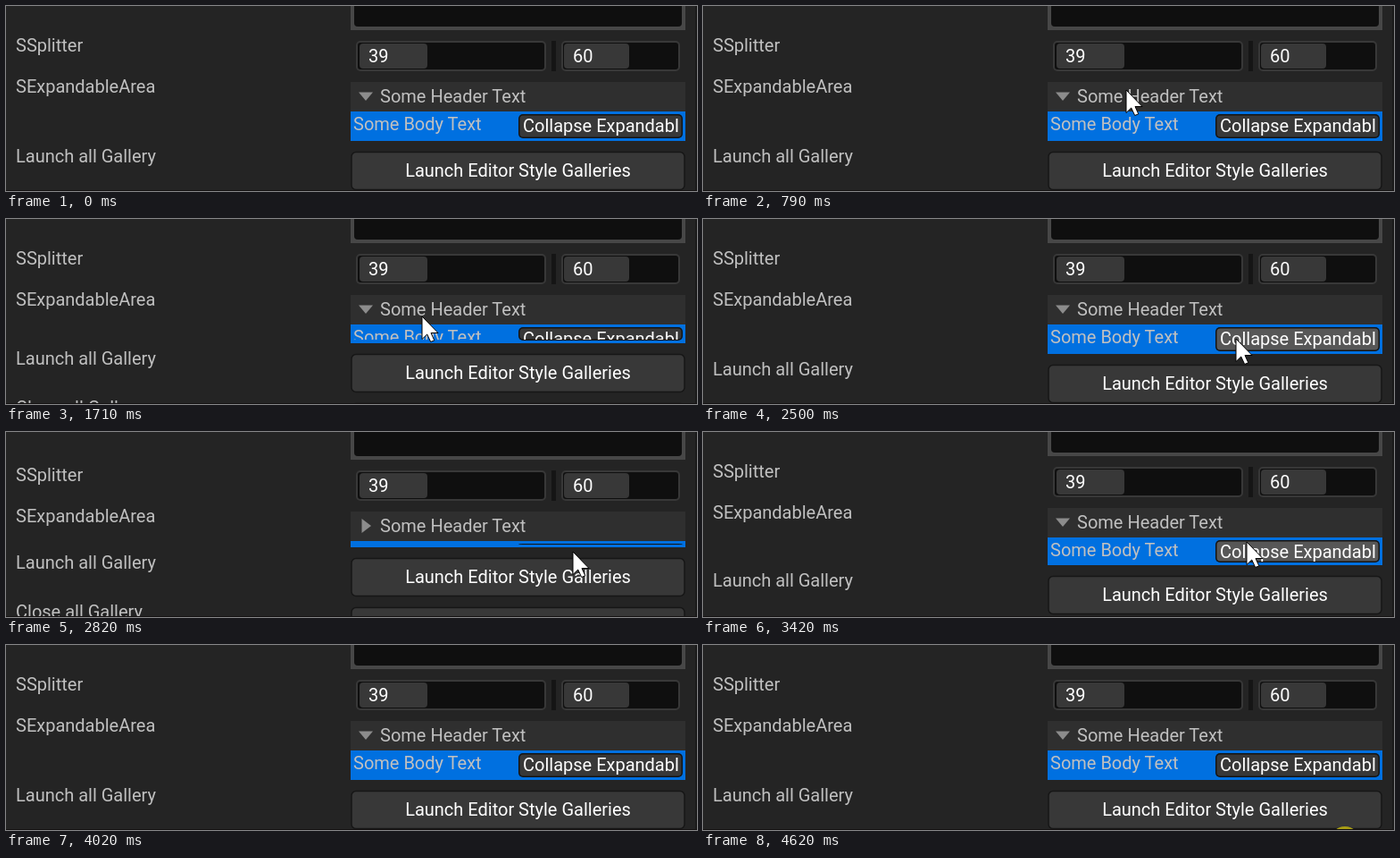
These frames come from a looping animation (774 px wide and 207 px high, 4680 ms). An HTML page:

```html
<!DOCTYPE html>
<html lang="en">
<head>
<meta charset="utf-8">
<title>Expandable area</title>
<style>
  html, body { margin: 0; width: 100%; height: 100%; overflow: hidden; background: #242424; }
  svg { display: block; font: 20px Roboto, sans-serif; fill: #c0c0c0; }
  .white { fill: #fff; }
  .mid { text-anchor: middle; }
  .field { fill: #0f0f0f; stroke: #383838; stroke-width: 2; }
  .bar { fill: #383838; }
  .button { fill: #383838; stroke: #161616; stroke-width: 1.5; }
  .hover { fill: #575757; }
</style>
</head>
<body>
<svg width="774" height="207" viewBox="0 0 774 207">
  <clipPath id="clip"><rect id="clipBox" x="386" y="121" width="375"/></clipPath>
  <rect width="774" height="207" fill="#242424"/>
  <rect x="772" width="2" height="207" fill="#1a1a1a"/>

  <g id="upper">
    <rect x="386" y="-60" width="375" height="87" fill="#474747"/>
    <rect x="390" y="-56" width="367" height="79" rx="4" fill="#0f0f0f"/>
    <text x="408" y="-8" fill="#4d4d4d">file, directory here</text>

    <text x="11" y="51">SSplitter</text>
    <rect class="field" x="393" y="40" width="211" height="32" rx="4"/>
    <rect class="bar" x="396" y="42" width="76" height="28" rx="4"/>
    <text class="white" x="406" y="63">39</text>
    <rect x="611" y="39" width="5" height="34" fill="#151515"/>
    <rect class="field" x="623" y="40" width="131" height="32" rx="4"/>
    <rect class="bar" x="625" y="42" width="73" height="28" rx="4"/>
    <text class="white" x="635" y="63">60</text>

    <text x="11" y="97">SExpandableArea</text>
    <rect x="386" y="85" width="375" height="33" fill="#2f2f2f"/>
    <path id="arrow" fill="#8c8c8c"/>
    <text x="419" y="108">Some Header Text</text>

    <rect id="body" x="386" y="118" width="375" fill="#0070e0"/>
    <rect id="edge" x="574" y="121" width="184" rx="5" fill="#141414"/>
    <rect id="face" x="575.5" y="122.5" width="181" rx="4" class="bar"/>
    <g clip-path="url(#clip)">
      <text x="389" y="139">Some Body Text</text>
      <text class="white" x="579" y="141">Collapse Expandabl</text>
    </g>
  </g>

  <g id="lower">
    <text x="11" y="175">Launch all Gallery</text>
    <rect id="launch" class="button" x="387" y="163.5" width="373" height="42" rx="5"/>
    <text class="white mid" x="573.5" y="191">Launch Editor Style Galleries</text>
    <text x="11" y="230">Close all Gallery</text>
    <rect class="button" x="387" y="218.5" width="373" height="42" rx="5"/>
  </g>

  <circle id="glow" cx="719" cy="220" r="17" fill="#aa9f14"/>
  <rect y="206" width="774" height="1" fill="#151212"/>
  <path id="cursor" d="M0 0V25.5L5.7 20L9.7 28.5L13.8 26.8L10 18.5H18Z" fill="#fff" stroke="#000"/>
</svg>
<script>
const LOOP = 4680, TICK = 66, FULL = 33, SPAN = 3.35;
// All times below are in ticks.
const moves = [ // start, end, x, y
  [3, 4, 626, 205], [4, 7, 474, 94], [21, 24, 466, 109], [30, 34, 597, 139], [37, 38, 597, 134],
  [38, 43, 635, 134], [45, 47, 609, 123], [52, 57, 629, 138], [57, 61, 674, 212]
];
const toggles = [ // end, final body height
  [0, FULL], [16, 0], [28.4, FULL], [45, 0], [53.4, FULL]
];
const el = id => document.getElementById(id);
const set = (id, name, value) => el(id).setAttribute(name, value);
const move = (id, x, y) => set(id, "transform", `translate(${x} ${y})`);
const clamp = v => Math.min(1, Math.max(0, v));

function cursorAt(n) {
  let x = 626, y = 240;
  for (const [start, end, toX, toY] of moves) {
    const p = 1 - (1 - clamp((n - start) / (end - start))) ** 2;
    x += (toX - x) * p;
    y += (toY - y) * p;
  }
  return [Math.round(x), Math.round(y)];
}

function bodyAt(n) {
  const [end, goal] = toggles.findLast(([end]) => n >= end - SPAN);
  const rest = FULL * clamp((end - n) / SPAN) ** 3; // cubic ease out
  const h = Math.round(goal ? FULL - rest : rest);
  return { h, open: goal > 0 && h > 0 };
}

function draw(t) {
  const n = Math.floor((t + 18) / TICK);
  const [x, y] = cursorAt(n);
  const { h, open } = bodyAt(n);
  const shift = Math.max(0, 11 - h); // the scroll position is clamped at the end
  const inner = Math.max(0, h - 6);
  move("upper", 0, shift);
  move("lower", 0, h - FULL + shift);
  move("cursor", x, y);
  set("body", "height", h);
  set("edge", "height", inner);
  set("clipBox", "height", Math.max(0, inner - 1));
  set("face", "height", Math.max(0, inner - 3));
  set("arrow", "d", open ? "M395 96.5H411L403 106Z" : "M398.5 93V109L409 101Z");
  el("face").classList.toggle("hover", x > 574 && y > 121 + shift && y < 121 + shift + inner);
  el("launch").classList.toggle("hover", y > 163 && y < 205);
  set("glow", "visibility", n >= 70 ? "visible" : "hidden");
}

const start = performance.now();
function tick() {
  draw((performance.now() - start) % LOOP);
  requestAnimationFrame(tick);
}
tick();
</script>
</body>
</html>
```
